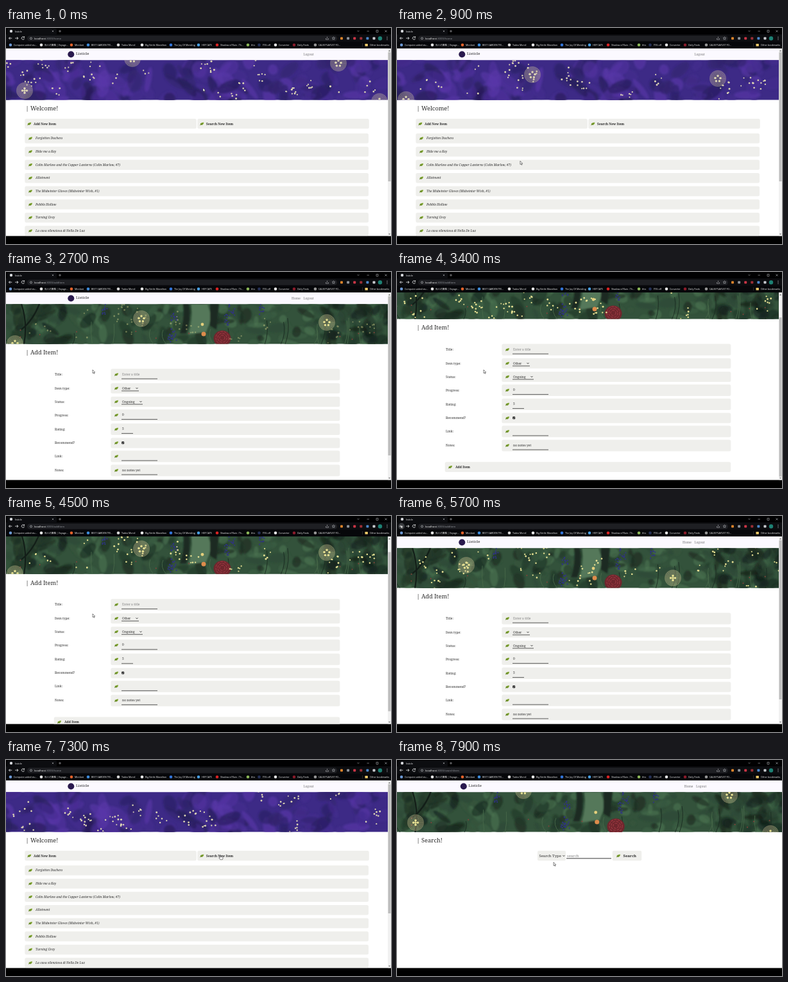
An HTML page for the animation above (8 s loop, 600 by 338 pixels).

```html
<!DOCTYPE html>
<html lang="en">
<head>
<meta charset="utf-8">
<title>listicle</title>
<style>
html, body { margin: 0; width: 100%; height: 100%; overflow: hidden; background: #000; }
svg { display: block; width: 100vw; height: 100vh; }
.serif { font-family: "Noto Serif", "Liberation Serif", serif; }
.ui { font-family: "Open Sans", "Noto Sans CJK JP", "Noto Sans", sans-serif; }
</style>
</head>
<body>
<svg id="stage" viewBox="0 0 600 338"></svg>
<script>
const LOOP = 8000;
const INK = '#2b2b2b', PANEL = '#efefec';

function seeded(seed) {
  return () => {
    seed = (seed + 0x6D2B79F5) | 0;
    let r = Math.imul(seed ^ seed >>> 15, 1 | seed);
    r = r + Math.imul(r ^ r >>> 7, 61 | r) ^ r;
    return ((r ^ r >>> 14) >>> 0) / 4294967296;
  };
}

const rect = (x, y, w, h, fill, r = 0, more = '') =>
  `<rect x="${x}" y="${y}" width="${w}" height="${h}" rx="${r}" fill="${fill}" ${more}/>`;
const dot = (x, y, r, fill, more = '') => `<circle cx="${x}" cy="${y}" r="${r}" fill="${fill}" ${more}/>`;
const line = (d, color, width = .7) => `<path d="${d}" fill="none" stroke="${color}" stroke-width="${width}"/>`;
const text = (x, y, size, str, fill = INK, more = '') =>
  `<text x="${x}" y="${y}" font-size="${size}" fill="${fill}" ${more}>${str}</text>`;
const group = (id, body, more = '') => `<g id="${id}" ${more}>${body}</g>`;
const repeat = (n, make) => Array.from({ length: n }, (_, i) => make(i)).join('');

const BOLD = 'font-weight="700"', ITALIC = 'font-style="italic"';

const leaf = (x, y) => `<g transform="translate(${x} ${y})">
  <path d="M-2.6 1.4C-2.6-1.6 0-2 3-2.2C2.8 1 .8 2.6-2.6 1.4Z" fill="#86ab35"/>
  <path d="M-3 2.2Q-1 .4 1.6-1M-2.2-.6L.6 1.6" fill="none" stroke="#4d6a22" stroke-width=".6"/></g>`;

// ---- Browser window -------------------------------------------------------

function browser() {
  const marks = [
    [7, 'Computer-aided stu...', '#6f9bd8'], [55, '石人の旅路 | Voyage...', '#eee'], [102, 'Mirolant', '#e8642c'],
    [128, 'BEST GARDEN TRI...', '#3f8fe0'], [175, 'Tadeo Morvil', '#ddd'], [212, 'Big Kettle Marathon', '#eee'],
    [257, 'The Joy Of Mending', '#3478e0'], [300, 'HEY CATS', '#4aa3e8'], [329, 'Shadow of Rain : Th...', '#e02424'],
    [377, 'this', '#8fbc5a'], [394.5, '75% off', '#27335a'], [420, 'Converter', '#eee'],
    [449, 'Daily Finds', '#8e1c2c'], [482, 'CALM PLAYLIST FO...', '#999']
  ];
  const tools = ['#d9822b', '#8d9299', '#c93545', '#9b2f35', '#4a86c8', '#c8cace'];
  const gray = '#d4d7db';
  return rect(0, 0, 600, 32, '#06070a') + rect(0, 0, 600, 10, '#010102') +
    rect(2, 1, 77, 10, '#0c0d10', 2) + rect(0, 10, 600, 11.5, '#0c0d10') +
    dot(8, 5, 2.2, '#d6d8dc') + text(14, 6.5, 3.8, 'listicle', '#f0f1f3') +
    line('M71.8 3.8l2.4 2.4m0-2.4l-2.4 2.4M82 5h4m-2-2v4', gray, .5) +
    line('M547.5 4l1.5 1.5l1.5-1.5M562.5 5h3.4M577 3.5h3v3h-3zM590.5 3.5l3 3m0-3l-3 3', gray, .5) +
    dot(7, 16, 5, '#3a3c40', 'id="backHover"') +
    line('M9.3 16H4.5m2-2l-2 2l2 2M14.2 16h4.8m-2-2l2 2l-2 2', '#f0f1f3', .8) +
    line('M28.2 14.5a2.2 2.2 0 1 0 .4 2M28.6 13v1.9h-1.9', '#f0f1f3', .8) +
    rect(33, 12, 483, 8.6, '#1e1f23', 4.3) + dot(39, 16.3, 1.5, 'none', `stroke="${gray}" stroke-width=".6"`) +
    `<text x="44" y="17.8" font-size="4.3" fill="#fff">localhost<tspan fill="#92969c">:3000/</tspan><tspan id="route" fill="#92969c"></tspan></text>` +
    line('M498.5 16v2h4v-2m-2-2.4v3M510.5 13.8l.7 1.5l1.6.2l-1.2 1.1l.3 1.6l-1.4-.8l-1.4.8l.3-1.6l-1.2-1.1l1.6-.2z', gray, .5) +
    tools.map((c, i) => rect(521 + i * 10.1, 14.3, 4, 4, c, 1)).join('') +
    dot(583, 16.2, 3.2, '#1d8174') + [14, 16, 18].map(y => dot(594, y, .6, gray)).join('') +
    marks.map(([x, s, c]) => dot(x, 26.5, 2.3, c) + text(x + 5, 27.9, 3.6, s, '#fff')).join('') +
    line('M555.5 24v5', '#45474b', .5) + rect(559.5, 24.8, 4.4, 3.6, '#f3cf6b', .5) +
    text(567, 27.9, 3.7, 'Other bookmarks', '#fff');
}

// ---- Banners and fireflies ------------------------------------------------

function blotches(seed, count, colors, size, filter, left = 0, width = 600) {
  const rnd = seeded(seed);
  return `<g filter="url(#${filter})">` + repeat(count, () => {
    const x = left + rnd() * width, y = 48 + rnd() * 66, c = colors[Math.floor(rnd() * colors.length)];
    const rx = size * (.4 + rnd()), ry = size * (.25 + rnd() * .5), turn = rnd() * 180 - 90;
    return `<ellipse rx="${rx.toFixed(1)}" ry="${ry.toFixed(1)}" fill="${c}" opacity=".6"
      transform="translate(${x.toFixed(1)} ${y.toFixed(1)}) rotate(${turn.toFixed(0)})"/>`;
  }) + '</g>';
}

const nightBanner = () => rect(0, 50, 600, 63, '#3d2a86') +
  blotches(7, 130, ['#2a2062', '#33246f', '#5333a0', '#5a38aa', '#452c90', '#241c55'], 16, 'soft');

function gardenBanner() {
  const rnd = seeded(31);
  const foliage = ['#1a2a20', '#22372a', '#3c5f44', '#4d7552', '#2e4a37', '#35563e'];
  const shade = ['#14211a', '#1b2c22', '#233a2b', '#2f4a37'];
  const stems = repeat(18, () => {
    const x = rnd() * 600, height = 12 + rnd() * 30, bend = rnd() * 24 - 12;
    const c = rnd() < .6 ? '#1b2c22' : '#48694a';
    return line(`M${x.toFixed(1)} 113q${bend.toFixed(1)} ${(-height / 2).toFixed(1)} ${(bend / 2).toFixed(1)} ${(-height).toFixed(1)}`, c, .9);
  });
  const bells = [[154, 58], [262, 72], [262, 98], [345, 74], [256, 105], [398, 60], [352, 60]].map(([x, y]) =>
    repeat(12, () => dot((x + rnd() * 9 - 4.5).toFixed(1), (y + rnd() * 18 - 9).toFixed(1), 1.1, '#2f3285'))).join('');
  const berries = repeat(12, () => dot((rnd() * 600).toFixed(1), (90 + rnd() * 21).toFixed(1), 1, '#84423a'));
  return rect(0, 50, 600, 63, '#33523b') +
    blotches(19, 170, foliage, 12, 'crisp') +
    blotches(43, 30, shade, 13, 'crisp', 0, 90) + blotches(47, 40, shade, 13, 'crisp', 490, 110) +
    `<g filter="url(#crisp)"><path d="M288 50h26l6 20l-8 24l-28 4q8-24 4-48z" fill="#55785a"/>
      <path d="M318 50h14l-4 40l-10-6zM276 50h9q4 26-4 46h-10q8-22 5-46z" fill="#1b2b21"/></g>` +
    stems + line('M24 50q10 30 4 63M52 50q-10 26-28 40', '#131e18', 2.2) + bells + berries +
    dot(308, 97, 3.5, '#dd8c4c') + dot(306, 82, 2.4, '#e4cf7c') +
    `<ellipse cx="337" cy="104" rx="13.5" ry="12.5" fill="#6f262d"/>` +
    [4, 7, 10].map(r => dot(337, 103, r, 'none', 'stroke="#a23c45" stroke-width="1" stroke-dasharray="4 1.5"')).join('');
}

const FIREFLIES = [
  [[29, 98], [197, 48], [518, 55], [582, 115]],
  [[14, 112], [211, 73], [500, 79]],
  [],
  [[108, 77], [430, 97]]
];

function firefly([x, y], plus) {
  const core = plus
    ? [[0, -3.4], [3.4, 0], [0, 3.4], [-3.4, 0], [0, 0]]
    : [[0, -4], [4, -.5], [2.4, 4], [-2.6, 4], [-4, -.8]];
  const rings = [6, 8, 10, 12].map(r =>
    dot(0, 0, r, 'none', 'stroke="currentColor" stroke-width=".8" stroke-dasharray="1 1.2" opacity=".5"')).join('');
  return `<g transform="translate(${x} ${y})">${dot(0, 0, 13, '#c9bd94', 'opacity=".3"')}${rings}
    ${core.map(([a, b]) => dot(a, b, 1.8, 'currentColor')).join('')}</g>`;
}

function sparkles(index) {
  const rnd = seeded(101 + index * 13);
  const clusters = repeat(24, () => {
    const x = rnd() * 596, y = 52 + rnd() * 58;
    return repeat(2 + Math.floor(rnd() * 5), () =>
      dot((x + rnd() * 20 - 10).toFixed(1), (y + rnd() * 18 - 9).toFixed(1), (1 + rnd() * .5).toFixed(2), 'currentColor'));
  });
  return group('glow' + index, `<g class="sparks">${clusters}</g>` + FIREFLIES[index].map((p, i) =>
    firefly(p, (index === 0 && i === 0) || (index === 3 && i === 1))).join(''));
}

// ---- Pages ----------------------------------------------------------------

const heading = str => text(30.5, 129.3, 9.2, '| ' + str);

const header = () => rect(0, 30, 600, 20.3, '#fbf9ff') + group('headerItems',
  dot(101.3, 41.2, 5, '#2a1a4e') +
  text(109, 42.4, 6, 'Listicle') + text(445, 42.9, 4.9, 'Home', '#777', 'id="homeLink"') +
  text(463.5, 42.9, 4.9, 'Logout', '#777'));

function homePage() {
  const items = [
    'Forgotten Duchess', 'Hide me a Key', 'Colin Marlow and the Copper Lanterns (Colin Marlow, #7)', 'Allotment',
    'The Midwinter Gloves (Midwinter Wish, #1)', 'Pebble Hollow', 'Turning Grey', 'La casa silenziosa di Nella De Luz'
  ];
  const button = (x, str) => rect(x, 142, 267.5, 15.5, PANEL, 2.5) + leaf(x + 7, 150) + text(x + 13.8, 151.6, 4.9, str, INK, BOLD);
  return heading('Welcome!') + button(29.3, 'Add New Item') + button(298.3, 'Search New Item') +
    items.map((s, i) => {
      const y = 172.8 + i * 20.65;
      return rect(29.3, y - 7.8, 535.7, 15.6, PANEL, 2.5) + leaf(38, y) + text(46, y + 1.6, 4.9, s, INK, ITALIC);
    }).join('');
}

function addPage() {
  const rows = [
    ['Title:', 160.5, 'Enter a title', 56], ['Item type:', 182, 'Other', 27, true], ['Status:', 203, 'Ongoing', 33, true],
    ['Progress:', 224, '0', 56], ['Rating:', 246, '5', 18], ['Recommend?', 267.5, null], ['Link:', 288.5, '', 56],
    ['Notes:', 310.5, 'no notes yet', 56]
  ];
  const body = rows.map(([label, y, value, width, select]) => {
    const half = select || value === null ? 8 : 9;
    let field;
    if (value === null) {
      field = rect(180.2, y - 2.2, 4, 4, '#222', .8) + line(`M181.2 ${y}l.8.8l1.4-1.8`, '#fff', .6);
    } else {
      const base = y + (select ? 4 : 6.6);
      field = text(181, y + (select ? 1.6 : 1), 4.9, value, label === 'Title:' ? '#808080' : INK) +
        line(`M180 ${base}h${width}`, '#333', .8) +
        (select ? line(`M${177 + width - 1.5} ${y - .9}l1.5 1.5l1.5-1.5`, '#222', .9) : '');
    }
    return text(76, y + 1.5, 4.9, label) + rect(163.3, y - half, 357, half * 2, PANEL, 2.5) + leaf(172, y) + field;
  }).join('');
  return heading('Add Item!') + body + rect(74.7, 336.3, 445.5, 15.6, PANEL, 2.5) +
    leaf(83, 344.3) + text(91, 346, 4.9, 'Add Item', INK, BOLD);
}

const searchPage = () => heading('Search!') +
  rect(219, 142, 44, 15.4, PANEL, 2) + text(221.5, 152, 5.9, 'Search Type') + line('M258.4 149.2l1.5 1.5l1.5-1.5', '#222', .9) +
  text(265, 152, 5.9, 'search', '#808080') + line('M264 154h70', '#333', 1) +
  rect(335.7, 142, 45.5, 15.4, PANEL, 2) + leaf(345, 150) + text(352.5, 152, 5.9, 'Search', INK, BOLD);

const scrollbar = () => rect(595, 32, 5, 293.5, '#f1f1f1') + rect(595.5, 38, 4, 200, '#bdbdbd', 0, 'id="thumb"') +
  `<path d="M596 36.4l1.5-1.8l1.5 1.8zM596 321.8l1.5 1.8l1.5-1.8z" fill="#666"/>`;

const pointer = () => group('cursor',
  `<path id="arrow" d="M0 0V5.4L1.3 4.3L2.2 6.2L3 5.8L2.2 4H3.8Z" fill="#fff" stroke="#111" stroke-width=".5"/>
   <path id="hand" d="M-.6 0q.7-.8 1.2 0v2.4l3 .7q.7.3.5 1.2l-.7 2.5H-.2L-2 4.2q.2-1 1.4 0z" fill="#fff" stroke="#111" stroke-width=".5"/>`);

document.getElementById('stage').innerHTML = `
  <defs>
    <filter id="soft" x="-5%" y="-30%" width="110%" height="160%"><feGaussianBlur stdDeviation="1.6"/></filter>
    <filter id="crisp" x="-5%" y="-30%" width="110%" height="160%"><feGaussianBlur stdDeviation=".8"/></filter>
    <clipPath id="view"><rect y="32" width="600" height="293.5"/></clipPath>
    <clipPath id="strip"><rect y="50.3" width="600" height="62.2"/></clipPath>
  </defs>
  <rect width="600" height="338"/>
  <g class="serif" clip-path="url(#view)">${rect(0, 32, 600, 294, '#fff')}` +
  group('page', header() +
    `<g clip-path="url(#strip)">${group('night', nightBanner())}${group('garden', gardenBanner())}
     ${group('glow', [0, 1, 2, 3].map(sparkles).join(''))}</g>` +
    group('home', homePage()) + group('add', addPage()) + group('search', searchPage())) +
  group('bar', scrollbar()) + `</g><g class="ui">${browser()}</g>` + pointer();

// ---- Motion ---------------------------------------------------------------

const el = id => document.getElementById(id);
const show = (id, on) => el(id).setAttribute('display', on ? 'inline' : 'none');
const ease = k => k * k * (3 - 2 * k);
const sparks = document.querySelectorAll('.sparks');

// Each key is [time, ...values]; values ease from key to key.
function track(keys, t) {
  const i = keys.findIndex(k => k[0] > t);
  if (i < 0) return keys[keys.length - 1].slice(1);
  if (i === 0) return keys[0].slice(1);
  const a = keys[i - 1], b = keys[i], k = ease((t - a[0]) / (b[0] - a[0]));
  return a.slice(1).map((v, j) => v + (b[j + 1] - v) * k);
}

const PATH = [
  [0, 307, 94], [500, 250, 300], [950, 190, 205], [1500, 72, 150], [2100, 72, 150], [2700, 135, 153], [5350, 135, 153],
  [5650, 6, 14], [5850, 6, 14], [6400, 216, 160], [6650, 216, 160], [7150, 334, 149], [7450, 334, 149], [7800, 244, 160]
];
const SCROLL = [[2850, 0], [3200, 39], [4400, 39], [4600, 5], [4700, 5], [4950, 0]];
const VISITS = [[-1000, 'home'], [2100, 'add'], [5800, 'home'], [7400, 'search']];

function glowAt(t) {
  const p = t % 2000;
  if (p < 300 || p >= 1750) return 0;
  if (p < 1000) return 1;
  return p < 1550 ? 2 : 3;
}

function render(t) {
  const [opened, page] = VISITS.filter(v => v[0] <= t).pop();
  const [scroll] = track(SCROLL, t), [x, y] = track(PATH, t);
  for (const name of ['home', 'add', 'search']) show(name, name === page);
  show('night', page === 'home');
  show('garden', page !== 'home');
  show('homeLink', page !== 'home');
  show('bar', page !== 'search');
  el('route').textContent = page === 'home' ? 'home' : page + 'Item';
  el('page').setAttribute('transform', `translate(0 ${-scroll})`);
  el('headerItems').setAttribute('transform', `translate(${page === 'search' ? 2.5 : 0} 0)`);
  el('garden').setAttribute('transform', `scale(${page === 'search' ? 1.012 : 1} 1)`);
  el('thumb').setAttribute('y', 38 + scroll * .85);
  el('thumb').setAttribute('height', page === 'home' ? 202 : 249);

  const glow = glowAt(t);
  for (let i = 0; i < 4; i++) show('glow' + i, i === glow);
  el('glow').setAttribute('color', page === 'home' ? '#ddd5b4' : '#e6e093');
  // Small lights appear a moment after a page opens.
  const lit = Math.min(1, Math.max(0, (t - opened - 500) / 250));
  sparks.forEach(s => s.setAttribute('opacity', lit));

  const onLink = y > 142 && y < 157 && (page === 'home' || (page === 'search' && x > 320));
  el('cursor').setAttribute('transform', `translate(${x} ${y})`);
  show('arrow', !onLink);
  show('hand', onLink);
  show('backHover', x < 12 && y < 21);
}

function frame() {
  render(performance.now() % LOOP);
  requestAnimationFrame(frame);
}
frame();
</script>
</body>
</html>
```
